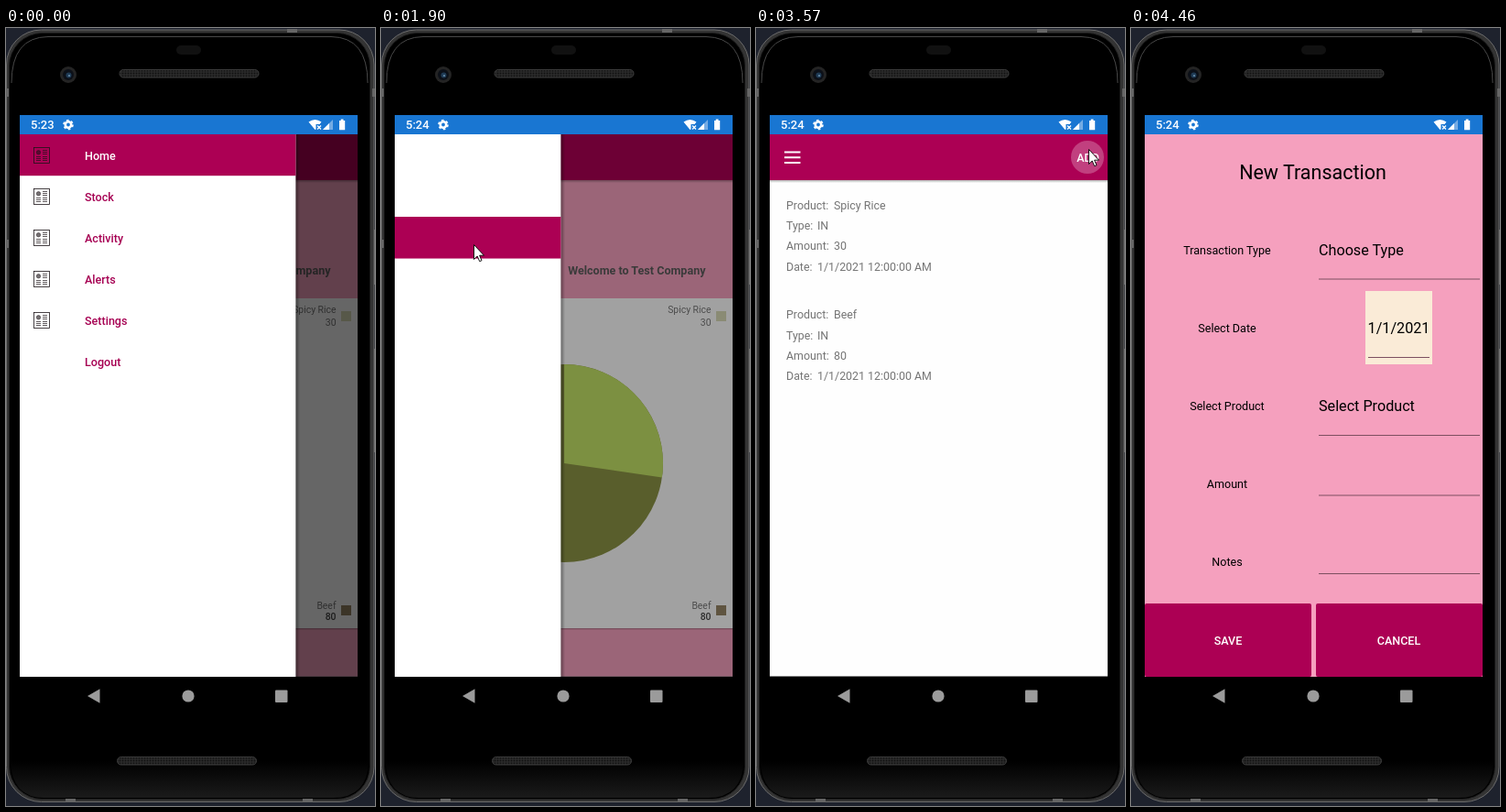
An HTML page that plays this animation: 403x849 px, repeating every 4990 ms.

```html
<!DOCTYPE html>
<html lang="en">
<head>
<meta charset="utf-8">
<title>Stock app walkthrough</title>
<style>
  html, body { margin: 0; width: 100%; height: 100%; overflow: hidden; background: #1e222d; }
  svg { display: block; width: 403px; height: 849px; font-family: Roboto, sans-serif; font-size: 12.56px; }
  .medium { font-weight: 500; }
  .bold { font-weight: 700; }
  .mid { text-anchor: middle; }
  .end { text-anchor: end; }
  .legend { font-size: 10.4px; fill: #777; }
  .big { font-size: 16.16px; }
  .list { font-size: 12.4px; fill: #757575; }
  .rule { stroke: #7c4f60; stroke-width: 1; }
  #ripple { transform-origin: 362px 141px; }
</style>
</head>
<body>
<svg viewBox="0 0 403 849" xmlns="http://www.w3.org/2000/svg">
  <defs>
    <clipPath id="screen"><rect x="15" y="116" width="369" height="591.6"/></clipPath>
    <linearGradient id="chin" x2="0" y2="1">
      <stop offset="0" stop-color="#000"/><stop offset="1" stop-color="#1b1b1b"/>
    </linearGradient>
    <linearGradient id="edge" x2="1" y2="0">
      <stop offset="0" stop-color="#000" stop-opacity=".4"/><stop offset="1" stop-color="#000" stop-opacity="0"/>
    </linearGradient>
    <linearGradient id="drop" x2="0" y2="1">
      <stop offset="0" stop-color="#000" stop-opacity=".3"/><stop offset="1" stop-color="#000" stop-opacity="0"/>
    </linearGradient>
    <pattern id="mesh" width="3" height="3" patternUnits="userSpaceOnUse">
      <rect width="3" height="3" fill="#2b2b2b"/><circle cx="1.5" cy="1.5" r="1" fill="#111"/>
    </pattern>
    <g id="news" fill="none" stroke="#1c1418">
      <rect x=".5" y=".5" width="17" height="17" stroke-width=".8"/>
      <circle cx="5.5" cy="5.8" r="2.2" fill="#1c1418" fill-opacity=".6" stroke-width=".5"/>
      <path d="M10 3.5h5M10 5.5h5M10 7.5h5M3 10.5h5M3 12.5h5M3 14.5h5M10 10.5h5M10 12.5h5M10 14.5h5" stroke-width=".7"/>
    </g>
  </defs>

  <!-- phone body -->
  <path d="M400 220h3v60h-3zM400 350h3v113h-3z" fill="#777"/>
  <rect x=".5" y="2" width="401.5" height="842.5" rx="38" fill="#343434" stroke="#6c6c6c"/>
  <rect x="3.500" y="5.500" width="394" height="836" rx="36" fill="#000" stroke="#1c1c1c"/>
  <path d="M6 60Q6 10 46 9.500H355Q395 10 395 60" fill="none" stroke="#484848"/>
  <path d="M5 800H396Q395 840 357 840H42Q6 840 5 800Z" fill="url(#chin)"/>
  <path d="M307 1h11v4h-11zM0 66h3v9h-3zM400 66h3v9h-3zM0 231h3v9h-3zM65 841h11v4h-11zM324 841h11v4h-11z" fill="#666"/>
  <rect x="186" y="19" width="27" height="10" rx="5" fill="#111"/>
  <circle cx="68" cy="51" r="9" fill="#242424"/>
  <circle cx="68" cy="51" r="6" fill="#0c1018"/>
  <circle cx="68.500" cy="51.500" r="3" fill="#1f3b55"/>
  <circle cx="69" cy="52" r="1" fill="#6f93b0"/>
  <rect x="124" y="45.500" width="152" height="8.500" rx="4.200" fill="url(#mesh)" stroke="#3d3d3d"/>
  <rect x="121.500" y="795.500" width="152" height="8.500" rx="4.200" fill="url(#mesh)" stroke="#3d3d3d"/>
  <g fill="#9b9b9b">
    <path d="M89 729L102.500 721.200V736.800Z"/>
    <circle cx="199" cy="729" r="6.600"/>
    <rect x="294" y="722.500" width="13.500" height="13.500" rx="1"/>
  </g>

  <!-- status bar -->
  <rect x="15" y="95" width="369" height="21" fill="#1976d2"/>
  <g fill="#fff">
    <g class="medium" font-size="13"><text id="early" x="27" y="110">5:23</text><text id="late" x="27" y="110">5:24</text></g>
    <circle cx="68" cy="105.500" r="3.200" fill="none" stroke="#fff" stroke-width="2.600"/>
    <circle cx="68" cy="105.500" r="5" fill="none" stroke="#fff" stroke-width="1.600" stroke-dasharray="2.600 2.636"/>
    <path d="M330.500 102.500Q337.500 97.500 344.500 102.500L342.500 105H338.500V110.500L337.500 111Z"/>
    <path d="M340 106.500l4 4m0-4l-4 4" stroke="#fff" stroke-width="1.300"/>
    <path d="M346 111L357 100V111Z" opacity=".4"/>
    <path d="M346 111L353 104V111Z"/>
    <path d="M364 101h1.700v-1.600h2.800v1.600h1.700v10.200h-6.200z"/>
  </g>

  <g clip-path="url(#screen)">
    <rect x="15" y="116" width="369" height="592" fill="#fefefe"/>

    <g id="home">
      <rect x="15" y="116" width="369" height="592" fill="#f5a0be"/>
      <rect x="15" y="295" width="369" height="360" fill="#fff"/>
      <rect x="15" y="655" width="369" height="2" fill="url(#drop)"/>
      <rect x="15" y="116" width="369" height="50" fill="#ac0054"/>
      <rect x="15" y="166" width="369" height="3" fill="url(#drop)"/>
      <text class="bold end" x="354.500" y="269" fill="#5c5c5c">Welcome to Test Company</text>
      <circle cx="200" cy="475" r="108" fill="#8c9445"/>
      <path d="M200 475V367A108 108 0 0 1 306.900 490.400Z" fill="#c4e466"/>
      <g class="legend end">
        <text x="360.500" y="311">Spicy Rice</text><text x="360.500" y="324.500">30</text>
        <text x="360.500" y="633.500">Beef</text><text x="360.500" y="645.500" class="medium" fill="#444">80</text>
      </g>
      <rect x="366" y="309" width="11" height="11" fill="#dadcb8"/>
      <rect x="366" y="630" width="11" height="11" fill="#968465"/>
    </g>

    <g id="activity">
      <rect x="15" y="116" width="369" height="50" fill="#ac0054"/>
      <rect x="15" y="166" width="369" height="3" fill="url(#drop)"/>
      <path d="M31 135.500h17.500M31 141.300h17.500M31 147h17.500" stroke="#fff" stroke-width="1.900"/>
      <g id="records">
        <text class="medium end" x="375" y="146" fill="#fff">ADD</text>
        <g id="list" class="list"></g>
      </g>
      <circle id="ripple" cx="362" cy="141" r="18" fill="#fff" opacity=".25"/>
    </g>

    <rect id="scrim" x="15" y="116" width="369" height="592"/>

    <g id="drawer">
      <rect x="316" y="116" width="5" height="592" fill="url(#edge)"/>
      <rect x="15" y="116" width="301.400" height="592" fill="#fff"/>
      <rect id="mark" x="15" y="116" width="301.400" height="45.200" fill="#ac0054"/>
      <g id="menu" class="medium" fill="#a60052"></g>
    </g>

    <g id="form">
      <rect x="15" y="116" width="369" height="592" fill="#f5a0be"/>
      <text class="mid" x="198.500" y="164.500" font-size="21.500">New Transaction</text>
      <g id="labels" class="mid"></g>
      <rect x="256" y="287" width="73" height="80" fill="#faebd7"/>
      <g class="big">
        <text x="205" y="248">Choose Type</text>
        <text class="mid" x="292.500" y="333">1/1/2021</text>
        <text x="205" y="418">Select Product</text>
      </g>
      <path class="rule" d="M205 274h176M259 359.500h67M205 444.500h176M205 510h176M205 595.500h176"/>
      <rect x="15" y="628" width="182" height="80" rx="2" fill="#ac0054"/>
      <rect x="202" y="628" width="182" height="80" rx="2" fill="#ac0054"/>
      <g class="medium mid" fill="#fff"><text x="106" y="672.500">SAVE</text><text x="292.500" y="672.500">CANCEL</text></g>
    </g>
  </g>

  <path id="cursor" d="M.5 .5V16.500L4.200 13L6.700 18.700L9 17.700L6.600 12.200H11.500Z" fill="#fff" stroke="#000" stroke-width=".9"/>
</svg>

<script>
const LOOP = 4990, TICK = 66, ROW = 45.2;
const $ = id => document.getElementById(id);

function add(parent, tag, attrs, text = '') {
  const el = document.createElementNS('http://www.w3.org/2000/svg', tag);
  for (const key in attrs) el.setAttribute(key, attrs[key]);
  el.textContent = text;
  return parent.appendChild(el);
}

function animate(el, css, points, easing) {
  const frames = points.map(([time, ...values], i) => ({
    offset: time / LOOP,
    easing: easing(time, (points[i + 1] || [LOOP])[0]),
    ...css(...values)
  }));
  frames.push({ ...frames[frames.length - 1], offset: 1 });
  el.animate(frames, { duration: LOOP, iterations: Infinity });
}

// Points are [time, ...values]: hold keeps each value, glide steps evenly to the next.
const hold = (el, css, points) => animate(el, css, points, () => 'step-end');
const glide = (el, css, points) => animate(el, css, points,
  (from, to) => `steps(${Math.max(1, Math.round((to - from) / TICK))}, end)`);

const show = on => ({ visibility: on ? 'visible' : 'hidden' });
const fade = opacity => ({ opacity });
const move = (x, y) => ({ transform: `translate(${x}px, ${y}px)` });
const scale = s => ({ transform: `scale(${s})` });
const tint = fill => ({ fill });

// Drawer menu
const items = ['Home', 'Stock', 'Activity', 'Alerts', 'Settings', 'Logout'].map((name, i) => {
  if (i < 5) add($('menu'), 'use', { href: '#news', x: 30, y: 130 + i * 45 });
  return add($('menu'), 'text', { x: 86, y: 144 + i * 45 }, name);
});

// Activity records
[['Spicy Rice', 30], ['Beef', 80]].forEach(([product, amount], n) => {
  const rows = [['Product:', product, 85], ['Type:', 'IN', 67], ['Amount:', amount, 85], ['Date:', '1/1/2021 12:00:00 AM', 67]];
  rows.forEach(([label, value, x], i) => {
    const y = 198 + n * 119.3 + i * 22.2;
    add($('list'), 'text', { x: 33, y }, label);
    add($('list'), 'text', { x, y }, value);
  });
});

// Form labels
['Transaction Type', 'Select Date', 'Select Product', 'Amount', 'Notes'].forEach((label, i) =>
  add($('labels'), 'text', { x: 105, y: 246.5 + i * 85.2 }, label));

// Clock
hold($('early'), show, [[0, 1], [930, 0]]);
hold($('late'), show, [[0, 0], [930, 1]]);

// Picking Activity and closing the drawer
hold($('mark'), move, [[0, 0, 0], [1700, 0, 2 * ROW]]);
hold(items[0], tint, [[0, '#fff'], [1700, '#a60052']]);
hold(items[2], tint, [[0, '#a60052'], [1700, '#fff']]);
glide($('drawer'), move, [[0, 0, 0], [1700, 0, 0], [1770, -20, 0], [1899, -20, 0], [1900, -120, 0], [2040, -310, 0]]);
hold($('scrim'), fade, [[0, .6], [1900, .37], [1970, 0]]);
hold($('home'), show, [[0, 1], [1970, 0]]);
hold($('activity'), show, [[0, 0], [1970, 1]]);
hold($('records'), show, [[0, 0], [2040, 1]]);

// Tapping ADD
glide($('ripple'), scale, [[0, 0], [3220, 0], [3430, 1], [3699, 1], [3700, 0]]);

// The form slides up and decelerates
const slide = Array.from({ length: 6 }, (_, i) => {
  const time = 3620 + 65 * i;
  return [time, 0, Math.round(592 * (1 - (time - 3600) / 620) ** 8)];
});
hold($('form'), move, [[0, 0, 600], ...slide, [4010, 0, 0]]);

// Pointer
hold($('cursor'), show, [[0, 0], [470, 1], [660, 0], [860, 1], [4460, 0]]);
glide($('cursor'), move, [
  [0, 329, 819], [470, 329, 819], [600, 32, 333], [860, 2, 264], [930, 63, 228],
  [1200, 110, 235], [1380, 101, 236], [2040, 101, 236], [2180, 106, 232], [2530, 323, 131],
  [2730, 372, 134], [2930, 372, 134], [3000, 363, 132], [3620, 363, 132],
  [3880, 357, 288], [4160, 389, 762], [4460, 399, 836]
]);
</script>
</body>
</html>
```
